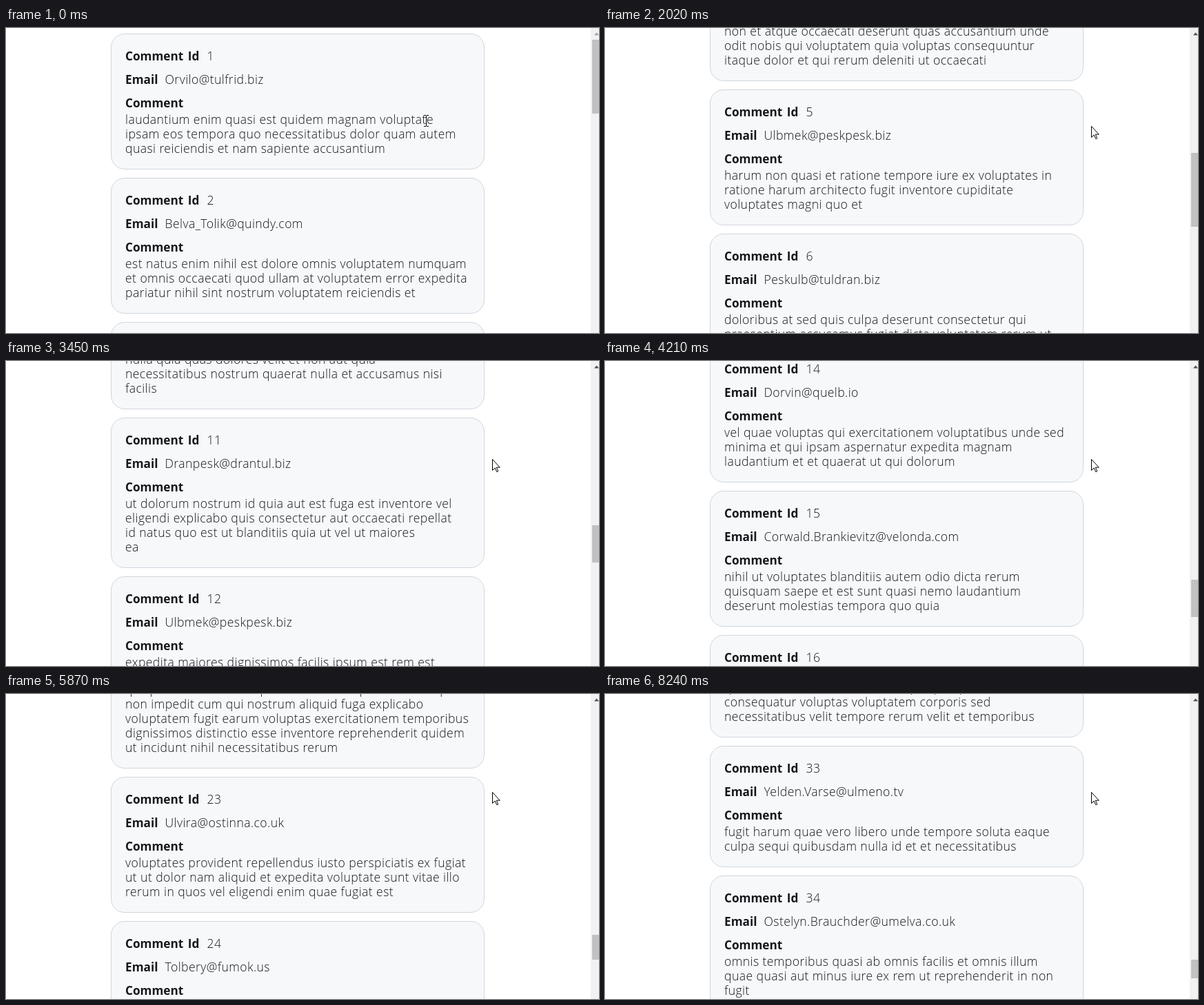
Write an HTML page that moves like this. It is 860x442 px and loops after 8.31 s.

```html
<!DOCTYPE html>
<html lang="en">
<head>
<meta charset="utf-8">
<title>Endless comments</title>
<style>
  html, body { margin: 0; width: 100%; height: 100%; overflow: hidden; background: #fff; }
  #stage { position: relative; width: 860px; height: 442px; overflow: hidden; }
  #list { position: absolute; left: 152px; top: 8px; }
  .card {
    box-sizing: border-box; width: 542px; margin-bottom: 12px; padding: 21px 20px 19px;
    border: 1px solid #d0d7de; border-radius: 20px; background: #f6f8fa;
    font: 300 17.6px/21px "Open Sans", "Noto Sans", sans-serif; letter-spacing: .42px;
    color: #14181c; white-space: pre;
  }
  .row { height: 34px; }
  .head { height: 24px; }
  b { display: inline-block; font-weight: 700; font-size: 17.2px; letter-spacing: 0; word-spacing: 2px; }
  .id b { width: 118.5px; }
  .mail b { width: 57.5px; }
  #bar { position: absolute; left: 848px; top: 0; width: 12px; height: 442px; background: #f1f1f1; }
  #thumb { position: absolute; left: 2px; width: 13px; background: #c1c1c1; }
  svg { position: absolute; left: 0; top: 0; overflow: visible; }
</style>
</head>
<body>
<div id="stage">
  <div id="list"></div>
  <div id="bar">
    <svg width="12" height="17"><path id="up" d="M5 10.5h7l-3.5-4z"/></svg>
    <div id="thumb"></div>
  </div>
  <svg id="cursor" width="12" height="20">
    <path id="beam" d="M0 .5h3M4 .5h3M3.5 1v15M0 16.5h3M4 16.5h3" fill="none" stroke="#000"/>
    <path id="arrow" d="M.5.5v16l3.7-3.5 2.6 5.7 2-.9-2.5-5.6h5z" fill="#fff" stroke="#000"/>
  </svg>
</div>
<script>
const LOOP = 8310, STEP = 69, TRACK = 464, VIEW = 505;

// One comment per row; a slash breaks the line.
const comments = `
laudantium enim quasi est quidem magnam voluptate/ipsam eos tempora quo necessitatibus dolor quam autem/quasi reiciendis et nam sapiente accusantium
est natus enim nihil est dolore omnis voluptatem numquam/et omnis occaecati quod ullam at voluptatem error expedita/pariatur nihil sint nostrum voluptatem reiciendis et
quia molestiae reprehenderit quasi aspernatur aut expedita/occaecati aliquam eveniet laudantium omnis quibusdam/delectus saepe quia accusamus maiores nam est cum et/ducimus et vero voluptates excepturi deleniti ratione
non et atque occaecati deserunt quas accusantium unde/odit nobis qui voluptatem quia voluptas consequuntur/itaque dolor et qui rerum deleniti ut occaecati
harum non quasi et ratione tempore iure ex voluptates in/ratione harum architecto fugit inventore cupiditate/voluptates magni quo et
doloribus at sed quis culpa deserunt consectetur qui/praesentium accusamus fugiat dicta voluptatem rerum ut/voluptate autem voluptatem repellendus aspernatur/dolorem in
maiores sed dolores similique labore et inventore et quasi/temporibus esse sunt id et eos voluptatem aliquam aliquid/ratione corporis molestiae mollitia quia et magnam dolor
ut voluptatem corrupti velit ad voluptatem maiores et nisi/velit vero accusamus maiores voluptates quia aliquid ullam/eaque
sapiente assumenda molestiae atque adipisci laborum/distinctio aperiam et ab ut omnis et occaecati aspernatur/odit sit rem expedita quas enim ipsam minus
voluptate iusto quis nobis reprehenderit ipsum amet/nulla quia quas dolores velit et non aut quia/necessitatibus nostrum quaerat nulla et accusamus nisi/facilis
ut dolorum nostrum id quia aut est fuga est inventore vel/eligendi explicabo quis consectetur aut occaecati repellat/id natus quo est ut blanditiis quia ut vel ut maiores/ea
expedita maiores dignissimos facilis ipsum est rem est/fugit velit sequi eum odio dolores dolor totam occaecati/ratione eius rem velit
fuga eos qui dolor rerum inventore corporis/exercitationem corporis cupiditate et deserunt/recusandae est sed quis culpa eum maiores corporis et
vel quae voluptas qui exercitationem voluptatibus unde sed/minima et qui ipsam aspernatur expedita magnam/laudantium et et quaerat ut qui dolorum
nihil ut voluptates blanditiis autem odio dicta rerum/quisquam saepe et est sunt quasi nemo laudantium/deserunt molestias tempora quo quia
iste ut laborum aliquid velit facere itaque quo ut soluta/dicta voluptate error tempore aut et sequi reiciendis/dignissimos expedita consequuntur libero sed fugiat/facilis
consequatur necessitatibus totam sed sit dolorum/recusandae quae odio excepturi voluptatum harum/voluptas quisquam sit ad eveniet delectus doloribus/odio qui non labore
veritatis voluptates necessitatibus maiores corrupti/neque et exercitationem amet sit et ullam velit sit/magnam laborum magni ut molestias
doloribus est illo sed minima aperiam ut dignissimos/accusantium tempore atque et aut molestiae magni ut/accusamus voluptatem quos ut voluptates quisquam/porro sed architecto ut
qui harum consequatur fugiat et eligendi perferendis at/molestiae commodi ducimus doloremque asperiores/numquam qui ut sit dignissimos reprehenderit tempore
deleniti aut sed molestias explicabo commodi odio/ratione nesciunt voluptate doloremque est nam autem/error delectus
qui ipsa animi nostrum praesentium voluptatibus odit qui/non impedit cum qui nostrum aliquid fuga explicabo/voluptatem fugit earum voluptas exercitationem temporibus/dignissimos distinctio esse inventore reprehenderit quidem/ut incidunt nihil necessitatibus rerum
voluptates provident repellendus iusto perspiciatis ex fugiat/ut ut dolor nam aliquid et expedita voluptate sunt vitae illo/rerum in quos vel eligendi enim quae fugiat est
repudiandae repellat quia sequi est dolore explicabo/nihil et et sit et et praesentium iste atque asperiores/tenetur
sunt aut quae laboriosam sit ut impedit adipisci harum/laborum totam deleniti voluptas odit rem ea non iure/distinctio ut velit doloribus et non ex
incidunt sapiente eaque dolor eos ad est molestias quas/sit et nihil exercitationem at cumque ullam nihil/magnam et
nisi vel quas ut laborum ratione rerum magni eum unde/et voluptatem saepe voluptas corporis modi amet ipsam/eos saepe porro
voluptatem repellendus quo alias at laudantium mollitia/quidem esse temporibus consequuntur vitae rerum illum/id corporis sit id
tempora voluptatem est magnam distinctio autem est/dolorem et ipsa molestiae odit rerum itaque corporis nihil/nam eaque rerum error
consequuntur quia voluptate assumenda et autem/voluptatem reiciendis ipsum animi est provident earum/aperiam sapiente ad vitae iste accusantium aperiam eius qui/dolore voluptatem et
dolores est ut quia velit enim beatae non ut aspernatur/sed nemo voluptas quaerat minus et nihil occaecati/aut tempore quos
dolorem eum ut similique error asperiores voluptas/quis et rerum nesciunt maxime quia perspiciatis/consequatur voluptas voluptatem corporis sed/necessitatibus velit tempore rerum velit et temporibus
fugit harum quae vero libero unde tempore soluta eaque/culpa sequi quibusdam nulla id et et necessitatibus
omnis temporibus quasi ab omnis facilis et omnis illum/quae quasi aut minus iure ex rem ut reprehenderit in non/fugit`.trim().split("\n");

const emails = {
  1: "Orvilo@tulfrid.biz", 2: "Belva_Tolik@quindy.com", 3: "Tiviko@girfolt.biz",
  8: "Wendara_Fulze@plova.org", 9: "Sovran_Pettel@vuno.us", 14: "Dorvin@quelb.io",
  15: "Corwald.Brankievitz@velonda.com", 23: "Ulvira@ostinna.co.uk", 24: "Tolbery@fumok.us",
  30: "Perlune@dorvik.biz", 31: "Rudolm@kremmoe.biz", 33: "Yelden.Varse@ulmeno.tv",
  34: "Ostelyn.Brauchder@umelva.co.uk"
};
const parts = ["vor", "tul", "mek", "quo", "dran", "ulb", "pesk"];
const part = n => parts[n % parts.length];
const invented = id => {
  const user = part(id) + part(id * 3 + 1);
  return user[0].toUpperCase() + user.slice(1) + "@" + part(id * 2 + 3) + part(id * 5 + 2) + ".biz";
};

const $ = id => document.getElementById(id);
$("list").innerHTML = comments.map((text, i) => {
  const id = i + 1;
  return `<div class="card"><div class="row id"><b>Comment Id</b>${id}</div>` +
    `<div class="row mail"><b>Email</b>${emails[id] || invented(id)}</div>` +
    `<div class="head"><b>Comment</b></div><div>${text.replace(/\//g, "\n")}</div></div>`;
}).join("");

const scrollKeys = [[0, 0], [1080, 0], [1210, 80], [1350, 223], [2640, 1391], [4210, 2830],
  [5870, 4675], [7150, 6126], [7700, 6590], [8240, 6852]];
const cursorKeys = [[0, 606, 126], [259, 606, 126], [260, 618, 70], [330, 634, 15],
  [660, 634, 15], [1080, 705, 142]];
const pageEnds = [2197, 4371, 6524, 8640];

// Linear between keys, moving in even steps like a screen recording.
function at(keys, t) {
  const i = keys.findIndex(k => k[0] > t);
  if (i < 0) return keys[keys.length - 1].slice(1);
  const a = keys[i - 1], b = keys[i], span = b[0] - a[0];
  const n = Math.max(1, Math.round(span / STEP));
  const u = Math.floor(n * (t - a[0]) / span + 1e-6) / n;
  return a.slice(1).map((v, j) => Math.round(v + (b[j + 1] - v) * u));
}

function draw(t) {
  const [y] = at(scrollKeys, t), [cx, cy] = at(cursorKeys, t);
  $("list").style.top = 8 - y + "px";

  // More comments load shortly before the end is reached.
  const size = pageEnds.find(end => y < end - VIEW - 400);
  $("thumb").style.top = Math.round(17 + TRACK * y / size) + "px";
  $("thumb").style.height = Math.round(TRACK * VIEW / size) + "px";
  $("up").setAttribute("fill", y ? "#505050" : "#a3a3a3");

  $("cursor").style.transform = `translate(${cx}px, ${cy}px)`;
  $("beam").style.display = t < 260 ? "" : "none";
  $("arrow").style.display = t < 260 ? "none" : "";
}

const start = performance.now();
function tick() {
  draw((performance.now() - start) % LOOP);
  requestAnimationFrame(tick);
}
tick();
</script>
</body>
</html>
```
